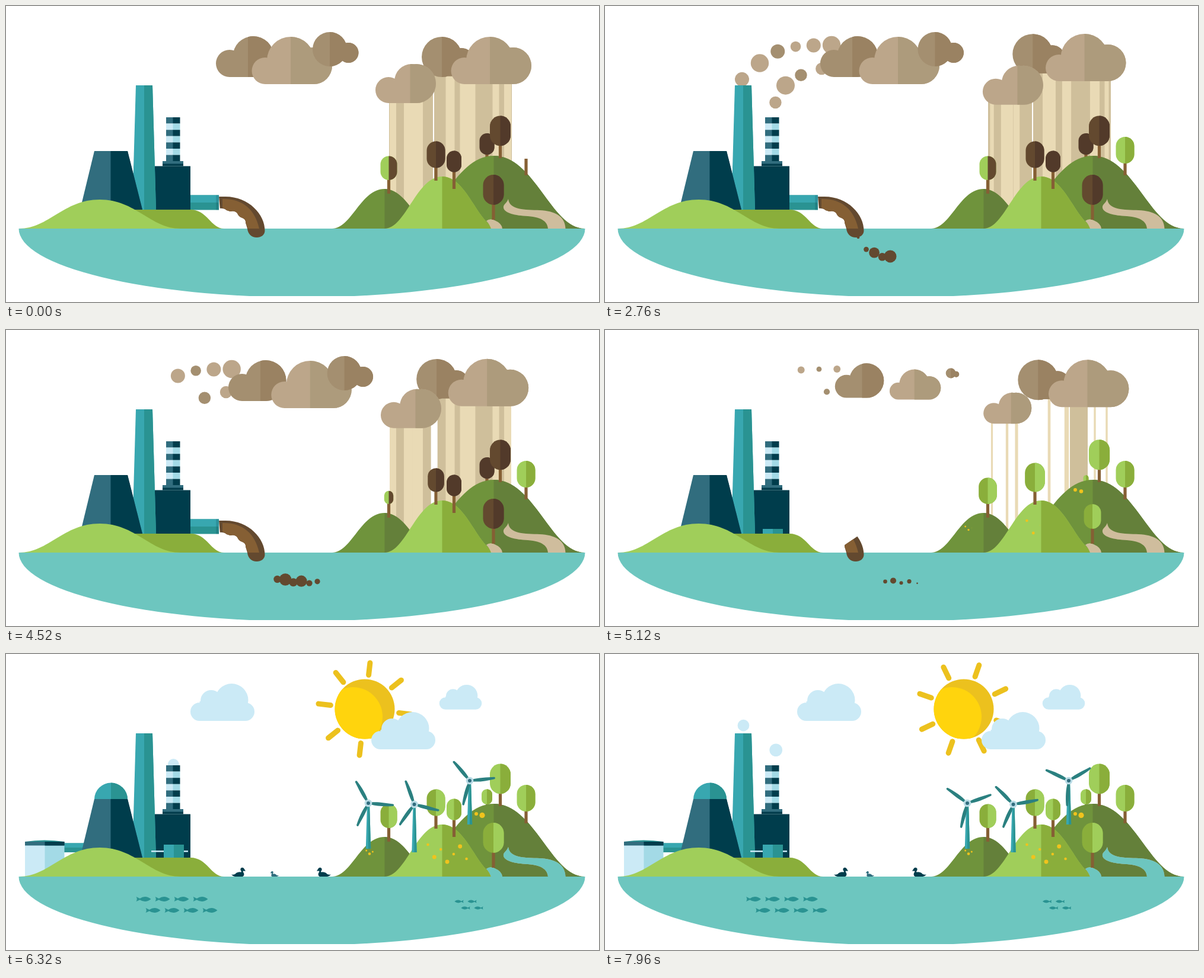
Write an HTML page with a canvas that moves like this. It is 1000x500 px and loops after 8 s.

```html
<!DOCTYPE html>
<html lang="en">
<head>
<meta charset="utf-8">
<title>From smog to sunshine</title>
<style>
html, body { margin: 0; width: 100%; height: 100%; overflow: hidden; background: #fff; }
canvas { display: block; width: 1000px; height: 500px; }
</style>
</head>
<body>
<canvas id="stage" width="1000" height="500"></canvas>
<script>
const g = document.getElementById('stage').getContext('2d');
const LOOP = 8000, GROUND = 376, TAU = Math.PI * 2, DEG = TAU / 360;
const C = {
  water: '#6dc6bf', navy: '#003d4c', slate: '#316d7e', teal: '#38a7b0', sea: '#2a9392',
  ice: '#cbeaf6', frost: '#a3dae6', lime: '#a0ce5a', olive: '#8aae3b', moss: '#6f933c', pine: '#64803a',
  mud: '#63492f', bark: '#523a2a', clay: '#855f34', tan: '#cfbd9d', sand: '#e9dab5', dust: '#cfbf9b',
  smog: '#bca68a', smogDark: '#ad9b7c', soot: '#a48f70', sootDark: '#9a8262', gold: '#ecc11e', sun: '#ffd40d'
};

// --- timing helpers
const clamp = u => Math.max(0, Math.min(1, u));
const lerp = (a, b, u) => a + (b - a) * u;
const win = (t, start, dur) => clamp((t - start) / dur);
const shrink = (t, start, dur) => 1 - win(t, start, dur) ** 2;
const grow = (t, start, dur) => 1 - (1 - win(t, start, dur)) ** 3;
const pop = (t, start, dur) => {
  const u = win(t, start, dur) - 1;
  return Math.max(0, 1 + 2.7 * u ** 3 + 1.7 * u * u);
};
const swing = (t, period) => (1 - Math.cos(TAU * t / period)) / 2;
// share of the way between the two clean poses
const travel = t => (t - 6320) / 1640;

// --- drawing helpers
const P = d => new Path2D(d);
function fill(path, color) { g.fillStyle = color; g.fill(path); }
function box(x, y, w, h, color) { g.fillStyle = color; g.fillRect(x, y, w, h); }
function dot(x, y, r, color) {
  if (r <= 0) return;
  g.fillStyle = color;
  g.beginPath();
  g.arc(x, y, r, 0, TAU);
  g.fill();
}
function group(draw) { g.save(); draw(); g.restore(); }
function split(path, x, left, right) {
  fill(path, left);
  group(() => {
    g.beginPath();
    g.rect(x, -100, 1200, 800);
    g.clip();
    fill(path, right);
  });
}
function scaled(x, y, sx, sy, draw) {
  if (sx <= 0 || sy <= 0) return;
  group(() => {
    g.translate(x, y);
    g.scale(sx, sy);
    g.translate(-x, -y);
    draw();
  });
}
function blob(circles, x, y, w, h) {
  const p = new Path2D();
  for (const [cx, cy, r] of circles) {
    p.moveTo(cx + r, cy);
    p.arc(cx, cy, r, 0, TAU);
  }
  p.rect(x, y, w, h);
  return p;
}
function hill(x, top, half) {
  const a = half * .45, b = half * .63;
  return P(`M${x - half},${GROUND}C${x - b},${GROUND} ${x - a},${top} ${x},${top}` +
    `C${x + a},${top} ${x + b},${GROUND} ${x + half},${GROUND}Z`);
}

// --- smog clouds
const wide = blob([[437, 109.5, 22.5], [480, 92, 40], [519, 101, 31]], 437, 92, 82, 40);
const sooty = blob([[377, 97, 23], [417, 85.5, 34.5]], 377, 95, 40, 25);
const tuft = blob([[546, 73, 29], [577.5, 79, 17]], 560, 70, 1, 1);
const rainy = blob([[645, 142, 22], [684, 127, 29], [692, 131, 33]], 645, 138, 47, 26);
const rear = blob([[735, 86, 34], [768, 92, 21]], 735, 90, 33, 28.5);

function smogCloud(path, cx, cy, dx, dy, s, mid, a, b) {
  group(() => {
    g.translate(dx, dy);
    scaled(cx, cy, s, s, () => split(path, mid, a, b));
  });
}
function leftClouds(t) {
  const a = t / 1000, d = 1.6 * a + 1.25 * a * a;
  smogCloud(sooty, 403, 85, d * .64, 0, shrink(t, 4925, 500), 408, C.soot, C.sootDark);
  smogCloud(wide, 482, 92, d, 0, shrink(t, 4820, 500), 480, C.smog, C.smogDark);
  smogCloud(tuft, 555, 73, d * .75, 0, shrink(t, 4700, 500), 546, C.soot, C.sootDark);
}
function rightClouds(t) {
  const o = swing(t, 6350);
  smogCloud(rear, 745, 86, -14.3 * o, -5 * o, shrink(t, 5120, 500), 735, C.soot, C.sootDark);
  smogCloud(wide, 482, 92, 336 - 7.8 * o, -5.2 * o, shrink(t, 5120, 500), 480, C.smog, C.smogDark);
  smogCloud(rainy, 674, 131, 14.5 * o, 2.8 * o, shrink(t, 4895, 500), 681.5, C.smog, C.smogDark);
}

// --- rain: dark sheets under light streaks [centre, width] that widen in turn
const streaks = [[652.5, 11], [678, 14], [694, 18], [749, 15], [778.5, 26], [826, 11], [846, 12]];
function rain(t) {
  const q = swing(t, 4700), dry = win(t, 4480, 450), end = win(t, 5130, 370);
  const sheet = (left, right, top) => box(left, top, right - left, 340 - top, C.dust);
  sheet(lerp(646, 683, dry), lerp(720, 683, dry), 140);
  sheet(lerp(lerp(722, 784, dry), 799, end), lerp(lerp(853, 814, dry), 799, end), 108);
  const thin = 1 - win(t, 4650, 670);
  streaks.forEach(([x, width], i) => {
    const w = width * (1 + (i % 2 ? .5 : -.45) * q) * thin, top = x < 720 ? 140 : 108;
    box(x - w / 2, top, w, 340 - top, C.sand);
  });
}

// --- smoke: paths by age in seconds
const tall = {
  count: 8, first: 40, gap: 445, cycle: 4, swell: 3.2, dark: i => i > 0 && i % 3 === 0,
  at: a => [231 + 68 * Math.max(0, a - .5), 66 + 74 * Math.exp(-a * a)]
};
const short = {
  count: 6, first: 150, gap: 560, cycle: 3, swell: 3.5, dark: i => i % 3 === 2,
  at: a => [281 + 12 * a + 14.2 * a * a, 90 + 102 * Math.exp(-.9 * a)]
};
function smoke(t, stack) {
  const s = 1 - win(t, 4820, 600);
  for (let i = 0; i < stack.count; i++) {
    const age = (t - stack.first - i * stack.gap) / 1000;
    if (age < 0 || age > 2.9) continue;
    const [x, y] = stack.at(age);
    const r = 12 + stack.swell * Math.cos(TAU * i / stack.cycle);
    dot(x, y, r * s * Math.min(1, .6 + age * 2), stack.dark(i) ? C.soot : C.smog);
  }
}
function steam(t, first, x, y, lean) {
  if (t < first) return;
  const u = (t - first) % 1200 / 1200;
  dot(x + lean * u, y - 66 * u, (9 + 4 * u) * (1 - win(u, .65, .35)), C.ice);
}

// --- sky
const fair = blob([[326.5, 97.5, 15.5], [346, 79, 18], [380.5, 78, 28], [403.5, 97.5, 15.5]], 326.5, 80, 77, 33);
function fairCloud(t, dx, dy, size, start, speed) {
  const s = size * pop(t, start, 550);
  group(() => {
    g.translate(dx + speed * travel(t), dy);
    scaled(365, 81.5, s, s, () => fill(fair, C.ice));
  });
}
function sunshine(t) {
  const s = pop(t, 5300, 800);
  scaled(605, 93, s, s, () => {
    group(() => {
      g.translate(605, 93);
      g.rotate((6.5 + 12.7 * travel(t)) * DEG);
      g.strokeStyle = C.gold;
      g.lineWidth = 9;
      g.lineCap = 'round';
      for (let i = 0; i < 8; i++) {
        g.beginPath();
        g.moveTo(0, -58);
        g.lineTo(0, -78.5);
        g.stroke();
        g.rotate(TAU / 8);
      }
    });
    dot(605, 93, 50.5, C.gold);
    group(() => {
      g.beginPath();
      g.arc(605, 93, 50.5, 0, TAU);
      g.clip();
      dot(585, 106, 50, C.sun);
    });
  });
}

// --- factory
const tallStack = P('M219,134H247L253,344H213Z');
const cone = P('M149,245H205L230,344H125Z');
const dome = P('M149,245.5A27.7,27.7 0 0 1 205,245.5Z');
const leftHill = hill(158, 327, 136);
const lowHill = P('M205,344H311C340,344 345,376 368,376H205Z');
const lid = P('M32,323.5V317H98.500V323.500Z');
function factory(t) {
  scaled(65, GROUND, 1, grow(t, 5200, 500), () => {
    box(98, 319.5, 35, 15.5, C.sea);
    box(98, 319.5, 35, 7.5, C.teal);
    box(32, 323, 34, 53, C.ice);
    box(65.5, 323, 33, 53, C.frost);
    fill(P('M32,317Q65,312 98.500,317Z'), C.sea);
    split(lid, 65.5, C.slate, C.navy);
  });
  for (let i = 0; i < 7; i++) {
    const y = 188 + i * 10.6;
    box(270, y, 12, 10.6, i % 2 ? C.ice : C.slate);
    box(281.5, y, 12, 10.6, i % 2 ? C.frost : C.navy);
  }
  box(264, 262, 35, 5, C.slate);
  box(264, 266.5, 35, 4, C.navy);
  box(245, 270.5, 66, 73.5, C.navy);
  const pipe = 48 * (1 - win(t, 4550, 380));
  box(311, 319.5, pipe, 25, C.sea);
  box(311, 319.5, pipe, 12.5, C.teal);
  box(311 + pipe * .9, 319.5, pipe * .1, 25, 'rgba(0,61,76,.2)');
  split(tallStack, 233, C.teal, C.sea);
  scaled(177, 245.5, 1, pop(t, 5200, 500), () => split(dome, 177, C.teal, C.sea));
  split(cone, 176.5, C.slate, C.navy);
  const rail = grow(t, 5350, 400);
  box(276 - 31 * rail, 332, 62 * rail, 2.5, C.ice);
  const door = 22 * grow(t, 5065, 400);
  box(266, 344 - door, 17, door, C.teal);
  box(283, 344 - door, 17, door, C.sea);
  fill(lowHill, C.olive);
  fill(leftHill, C.lime);
}

// --- sludge
const edge = 'L404,366C405,361 400,358 396,357Q392,355 390,350Q386,345 378,347L372,345';
const gush = P(`M359,322H370C410,322 437,353 436.500,380C436,387 430,391 423,391C414,391 408,385 407,376${edge}Q367,341 359,342Z`);
const gushLight = P(`M365,326C398,325 420,343 427,376H408${edge}Q369,342 365,341Z`);
function sludge(t) {
  const wipe = -95 + 105 * win(t, 4630, 850);
  if (wipe < 10) group(() => {
    g.beginPath();
    g.moveTo(365, 390);
    g.arc(365, 390, 120, wipe * DEG, 1);
    g.closePath();
    g.clip();
    fill(gush, C.mud);
    fill(gushLight, C.clay);
  });
  const s = 1 - win(t, 4750, 720);
  for (let i = 0; i < 6; i++) {
    const age = (t - 480 - i * 540) / 1000;
    if (age < 0 || age > 4.4) continue;
    const r = (i % 2 ? 7 : 10.5) * Math.sin(Math.PI * age / 4.4) ** .6;
    dot(424 + 25 * age, 425 - 40 * Math.exp(-1.3 * age) + i % 2 * 3, r * s, C.mud);
  }
}

// --- hills and plants
const backHill = hill(822.5, 253, 153.5);
const smallHill = hill(638, 309, 88);
const frontHill = hill(735.5, 288, 97);
const river = P('M847,326C844,334 838,335 839,341C841,350 858,354 880,355C905,357 913,365 914,376H943.500C943,355 925,346 900,345C875,344 849,345 847,326Z');
const brook = P('M810,363Q816,358 824,362Q836,367 837,376H818Q815,368 810,363Z');

// listed in the order they turn green
const trees = [
  { x: 645.5, top: 253.5, w: 28, foot: 317, flip: true, half: true },
  { x: 725, top: 228.5, w: 31, foot: 295, flip: true },
  { x: 833.5, top: 185.5, w: 35, foot: 257 },
  { x: 822, top: 285, w: 35, foot: 361, flip: true },
  { x: 811, top: 215, w: 25, foot: 262, whole: true, later: .72 },
  { x: 755.5, top: 244.5, w: 25, foot: 309, whole: true }
];
const evergreen = { x: 877, top: 221, w: 31, foot: 286 };
function tree(t, { x, top, w, foot, flip, half, whole, later = 1 }, swap) {
  const green = t >= swap, bottom = top + w * 1.45;
  const s = green ? later * pop(t, swap, 800) : shrink(t, swap - 300, 300);
  let colors = flip ? [C.olive, C.lime] : [C.lime, C.olive];
  if (!green) colors = half ? [C.lime, C.mud] : [whole ? C.bark : C.mud, C.bark];
  const trunk = () => box(x - 2.6, bottom - 8, 5.2, foot - bottom + 8, C.clay);
  const crown = () => {
    const p = new Path2D();
    p.roundRect(x - w / 2, top, w, bottom - top, w / 2);
    split(p, x, ...colors);
  };
  if (whole) scaled(x, foot, s, s, () => { trunk(); crown(); });
  else {
    trunk();
    scaled(x, bottom, s, s, crown);
  }
}
// flowers scattered evenly over a patch
function meadow(t, x, y, w, h, count, size) {
  for (let i = 0; i < count; i++) {
    const r = size * (.75 + .4 * (i % 2)) * pop(t, 4960 + i * 70, 450);
    dot(x + w * (i + .5) / count, y + h * (i * .618 % 1), r, '#f0c31d');
  }
}
function land(t) {
  const plant = i => tree(t, trees[i], 4620 + i * 100);
  plant(4);
  split(backHill, 822.5, C.moss, C.pine);
  split(smallHill, 638.5, C.moss, C.pine);
  split(frontHill, 735.5, C.lime, C.olive);
  const wet = win(t, 5250, 350);
  for (const p of [river, brook]) {
    fill(p, C.tan);
    g.globalAlpha = wet;
    fill(p, C.water);
    g.globalAlpha = 1;
  }
  meadow(t, 788, 270, 20, 4, 2, 4);
  meadow(t, 706, 322, 76, 34, 7, 3);
  meadow(t, 605, 332, 16, 9, 3, 2);
  [2, 0, 1, 5, 3].forEach(plant);
  tree(t, evergreen, 0);
}

// --- turbines
const blade = P('M3,-1.500C14,-4 30,-2.500 42,-2Q44.500,-.500 42,1.500C28,3.500 14,4 3,1.500Z');
function turbine(t, x, y, foot, angle, start) {
  const s = pop(t, start, 600);
  scaled(x, foot, s, s, () => {
    split(P(`M${x - 2},${y}H${x + 2}L${x + 4.2},${foot}H${x - 4.2}Z`), x, C.teal, C.sea);
    for (const turn of [0, 111.5, 236]) group(() => {
      g.translate(x, y);
      g.rotate((angle + turn + 100 * travel(t)) * DEG);
      fill(blade, '#2b8080');
    });
    dot(x, y, 6.3, '#b8dbe5');
    dot(x, y, 3, C.slate);
  });
}

// --- animals
const fishShape = P('M12,0Q3,-7.500 -6,-1L-12,-4Q-9.500,0 -12,4L-6,1.200Q3,7.500 12,0Z');
const duckShape = P('M-11,-3.500Q-5,-2.500 -3,-6Q1,-8.500 5,-7.500Q7,-8 5,-10Q3,-14 7,-15.200Q10,-15.500 11,-12.500L13,-9.500L9,-9.500Q8,-8.500 10,-6Q11.500,-2 8,0H-5Q-9,-1 -11,-3.500Z');
function animal(shape, x, y, sx, sy, color) {
  group(() => {
    g.translate(x, y);
    g.scale(sx, sy);
    if (sy > 0) fill(shape, color);
  });
}
// two loose rows, every other fish swims lower
function school(t, count, x, y, step, drop, size, way) {
  for (let i = 0; i < count; i++) {
    const s = size * pop(t, 5350 + i * 40, 450);
    animal(fishShape, x + i * step + way * 18.5 * travel(t), y + i % 2 * drop, way * s, s * .95, C.sea);
  }
}
function duck(t, x, size, way, color) {
  const s = size * pop(t, 5450, 450);
  animal(duckShape, x + way * 6 * travel(t), GROUND, way * s, s, color);
}

function water() {
  group(() => {
    g.beginPath();
    g.rect(0, GROUND, 1000, 114);
    g.clip();
    g.fillStyle = C.water;
    g.beginPath();
    g.ellipse(499, GROUND, 477.5, 116, 0, 0, Math.PI);
    g.fill();
  });
}

function draw(t) {
  box(0, 0, 1000, 500, '#fff');
  sunshine(t);
  fairCloud(t, 0, 0, 1, 5250, 13);
  fairCloud(t, 305, 48, 1, 5400, 19);
  fairCloud(t, 401.5, -8.7, .663, 5330, 7);
  smoke(t, tall);
  smoke(t, short);
  steam(t, 6500, 233, 135, 2);
  steam(t, 6220, 281, 192, 16);
  leftClouds(t);
  rain(t);
  rightClouds(t);
  factory(t);
  water();
  land(t);
  turbine(t, 611, 252, 329, 4.7, 5300);
  turbine(t, 782, 214, 288, -6, 5390);
  turbine(t, 688.5, 254, 335, 14, 5480);
  sludge(t);
  school(t, 8, 232, 414, 16, 19, 1.04, 1);
  school(t, 4, 764, 418, 11, 11, .64, -1);
  duck(t, 391, 1, 1, C.navy);
  duck(t, 453.5, .6, -1, C.slate);
  duck(t, 537, 1, -1, C.navy);
}

const begin = performance.now();
function tick() {
  draw((performance.now() - begin) % LOOP);
  requestAnimationFrame(tick);
}
tick();
</script>
</body>
</html>
```
